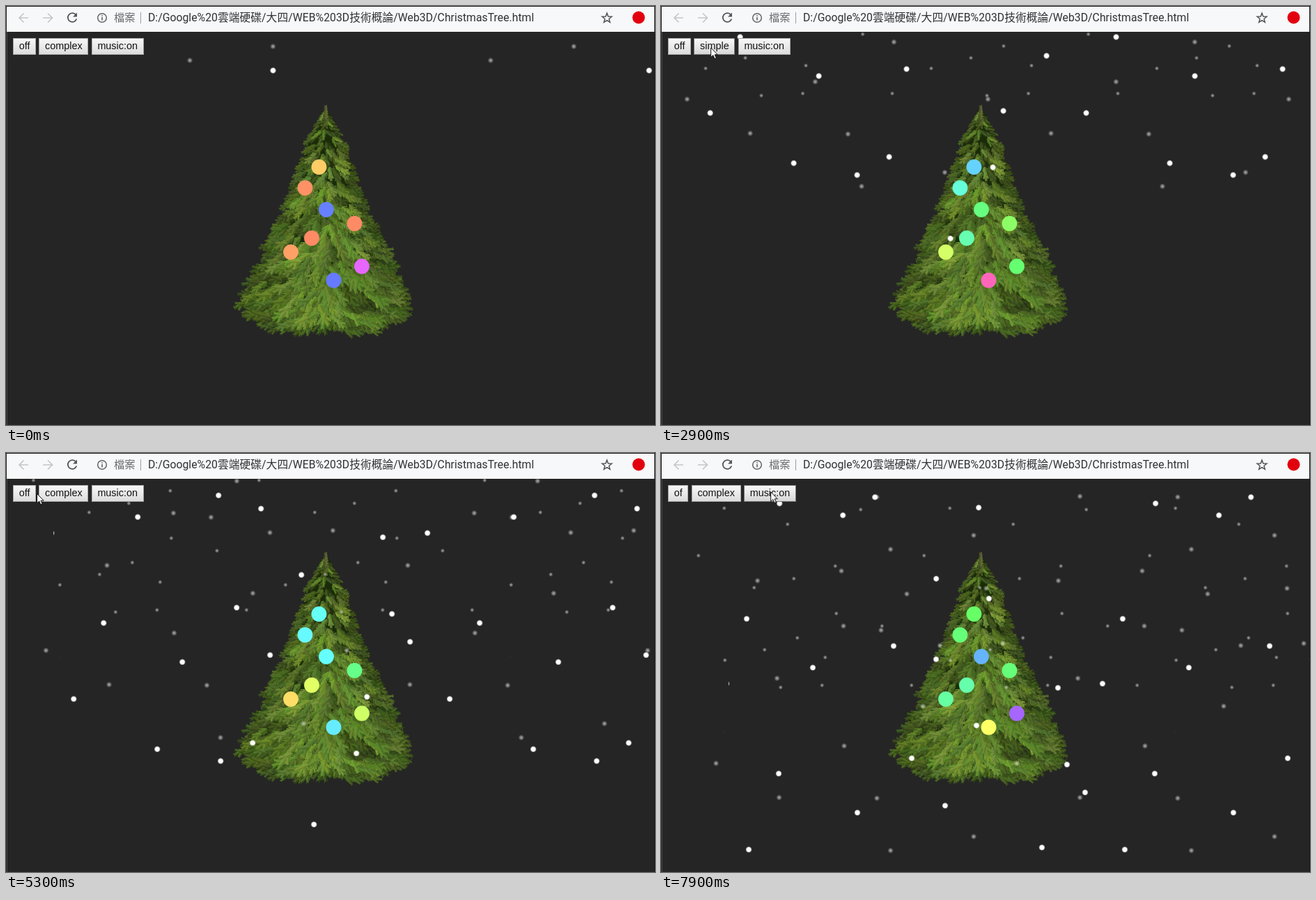
These frames come from a looping animation (932x601 px, 8 s). An HTML page with a canvas:

```html
<!DOCTYPE html>
<html lang="zh-Hant">
<head>
<meta charset="utf-8">
<title>ChristmasTree</title>
<style>
  html, body { margin: 0; width: 100%; height: 100%; overflow: hidden; background: #252525; }
  #stage { position: absolute; left: 0; top: 0; width: 932px; height: 601px; overflow: hidden; background: #252525; }
  #stage > canvas, #stage > svg { position: absolute; left: 0; top: 0; display: block; }
  #buttons { position: absolute; left: 10px; top: 46px; display: flex; gap: 4.3px; }
  #buttons span {
    box-sizing: border-box; height: 24px; padding: 0 7.7px; border: 1px solid #a6a6a6;
    background: linear-gradient(#f7f7f7, #dcdcdc); color: #111; white-space: nowrap;
    font: 14.4px/21.5px "Liberation Sans", Arial, sans-serif;
  }
  #buttons span.hover { border-color: #777; background: linear-gradient(#f8f8f8, #d6d6d6); }
  .url { font: 15.8px Roboto, "Noto Sans CJK TC", "Noto Sans CJK", sans-serif; }
</style>
</head>
<body>
<div id="stage">
  <canvas id="scene" width="932" height="601"></canvas>
  <svg width="932" height="601" fill="none">
    <rect width="932" height="37" fill="#f7f8f9"/>
    <path d="M0 .5H932" stroke="#222"/>
    <path d="M.5 0V601" stroke="#222"/>
    <path d="M1.5 37V601" stroke="#4a4a4a"/>
    <path d="M931.5 0V601" stroke="#151515"/>
    <g stroke="#c3c5c8" stroke-width="1.6">
      <path d="M32 17H19.500M25.500 10.500L19 17L25.500 23.500"/>
      <path d="M53 17H66M60 10.500L66.500 17L60 23.500"/>
    </g>
    <path d="M100.300 12.600A6.400 6.400 0 1 0 101.300 18.500" stroke="#55585c" stroke-width="1.8"/>
    <path d="M102 9.500V15.500H96Z" fill="#55585c"/>
    <circle cx="138" cy="17" r="6.300" stroke="#606367" stroke-width="1.5"/>
    <path d="M138 16V20.500M138 13.200V14.800" stroke="#606367" stroke-width="1.6"/>
    <text class="url" x="155" y="22" fill="#6a6d71" style="font-size:15.300px">檔案</text>
    <path d="M193.500 9V25" stroke="#9a9da1"/>
    <text class="url" x="204" y="22" fill="#303236">D:/Google%20雲端硬碟/大四/WEB%203D技術概論/Web3D/ChristmasTree.html</text>
    <path id="star" stroke="#505357" stroke-width="1.5"/>
    <circle cx="908.500" cy="16.500" r="9" fill="#e2000f"/>
  </svg>
  <div id="buttons"><span></span><span></span><span>music:on</span></div>
  <svg id="cursor" width="14" height="20"><path d="M.7 1V14.500L3.900 11.600L6 16.600L8.300 15.600L6.200 10.800H10.300Z" fill="#fff" stroke="#111"/></svg>
</div>
<script>
const LOOP = 8000, STEP = 100, HEAD = 37;
const ctx = document.getElementById('scene').getContext('2d');
const buttons = [...document.querySelectorAll('#buttons span')];
const cursor = document.getElementById('cursor');

// Snow sheets: tile size, fall speed (px/s), flake look, flake positions at time 0.
const LEAD = 0.85, SHEET = 568.5, SLANT = 2 / 15;
const layers = [
  { tile: 324, vy: 41.54, r: 3.2, core: 0.2, alpha: 0.52, flakes: [
    10, -181, 206.5, -166, 147, -148, 90, -135, 208, -98, 273.6, -80, 152, -63, 105, -46,
    192, -35, 48, -31, 128, 8, 187.5, 5, 316, 5, 243, -247, 138, -226, 47, -249] },
  { tile: 432, vy: 62.3, r: 4.3, core: 0.2, alpha: 0.55, flakes: [
    104, -430, 244.4, -429, 383.4, -374, 264, -354, 193.4, -323, 73, -309, 287.4, -290, 401.4, -298,
    196.4, -244, 250.4, -238, 335, -216, 425.4, -219, 101, -169, 310.4, -129, 197.4, -72, 13.4, -47] },
  { tile: 540, vy: 83.08, r: 4.7, core: 0.62, alpha: 1, flakes: [
    35.5, -418.5, 130.5, -348.5, 246.5, -379.5, 307.5, -360.5, 383.5, -447.5, 482.5, -319.5, 546.5, -325.5,
    365.5, -265.5, 272.5, -218.5, 495.5, -209.5, 320.5, -150.5, 81.5, -196.5, 521.5, -169.5, 194.5, -140.5,
    38.5, -87.5, 158.5, -15.5, 295.5, -24.5, 249.5, 1.5, 444.5, -9.5, 459.5, -90.5] }
];

const balls = [[449.5, 231], [429.5, 261], [460, 292], [500.5, 312], [439, 333], [409, 353], [511, 373.5], [470.5, 393.5]];
const hues = [
  [0, [40, 17, 230, 14, 14, 23, 290, 232]],
  [2100, [283, 180, 130, 18, 147, 78, 197, 38]],
  [3700, [112, 152, 130, 192, 152, 75, 52, 255]],
  [4600, [170, 205, 147, 80, 95, 67, 33, 203]],
  [6900, [190, 130, 255, 258, 17, 0, 185, 152]],
  [7900, [120, 128, 210, 128, 147, 143, 265, 60]]
];
const labels = [[0, 'off', 'complex'], [1200, 'off', 'simple'], [4900, 'off', 'complex'], [5700, 'on', 'complex'], [6500, 'of', 'complex']];
const pointer = [[300, [150, 31]], [800, [71, 59]], [4900, [71, 59]], [5400, [37, 57]], [5600, [33, 55]], [6500, [33, 55]], [6900, [120, 55]], [7900, [157, 55]]];

const lerp = (a, b, k) => a + (b - a) * k;
const lerpHue = (a, b, k) => a + ((b - a + 540) % 360 - 180) * k;

function sample(keys, t, mix) {
  let i = keys.findIndex(k => k[0] > t);
  if (i < 0) return keys[keys.length - 1][1];
  i = Math.max(i, 1);
  const [t0, a] = keys[i - 1], [t1, b] = keys[i];
  const k = Math.max(0, (t - t0) / (t1 - t0));
  return a.map((v, j) => mix(v, b[j], k));
}

function makeCanvas(w, h) {
  const c = document.createElement('canvas');
  c.width = w;
  c.height = h;
  return c;
}

function random(seed) {
  return () => (seed = (seed * 16807) % 2147483647) / 2147483647;
}

// Half width of the tree at height y.
const profile = [[142, 1], [155, 8], [170, 18], [190, 29], [215, 39], [245, 49], [265, 54], [290, 66], [305, 72],
  [340, 92], [365, 101], [385, 111], [410, 123], [435, 133], [450, 112], [465, 94], [472, 66]];
const halfWidth = y => sample(profile.map(([a, b]) => [a, [b]]), y, lerp)[0];

function drawTree() {
  const c = makeCanvas(932, 601), g = c.getContext('2d'), rnd = random(2718);
  const cx = 459;

  function sprig(x, y, angle, len, hue, sat, light) {
    const dx = Math.cos(angle), dy = Math.sin(angle);
    const x0 = x - dx * len, y0 = y - dy * len;
    const strokes = [0, 1].map(() => new Path2D());
    for (let d = 0; d <= len; d += 1.7) {
      const reach = Math.min(7.5, len * 0.3) * (1 - 0.55 * d / len) * lerp(0.75, 1.15, rnd());
      [-1, 1].forEach((side, i) => {
        const a = angle + side * lerp(0.5, 0.95, rnd());
        const px = x0 + dx * d, py = y0 + dy * d;
        strokes[i].moveTo(px, py);
        strokes[i].lineTo(px + Math.cos(a) * reach, py + Math.sin(a) * reach);
      });
    }
    g.lineWidth = 1.15;
    strokes.forEach((p, i) => {
      g.strokeStyle = `hsl(${hue},${sat}%,${light + (i ? 4 : -3)}%)`;
      g.stroke(p);
    });
    g.strokeStyle = `hsl(${hue - 12},${sat - 8}%,${light + 3}%)`;
    g.beginPath();
    g.moveTo(x0, y0);
    g.lineTo(x, y);
    g.stroke();
  }

  function bough(u, y, light) {
    const size = lerp(11, 36, Math.min(1, (y - 142) / 270)) * lerp(0.7, 1.15, rnd());
    const lift = lerp(1.1, 1.42, (y - 142) / 330);
    const angle = Math.PI / 2 - Math.sign(u) * Math.pow(Math.abs(u), 0.7) * lift + (rnd() - 0.5) * 0.6;
    const x = cx + u * (halfWidth(y) - 2);
    const hue = lerp(80, 92, rnd()), sat = lerp(44, 58, rnd());
    sprig(x, y, angle, size, hue, sat, light);
    if (size > 16) [-1, 1].forEach(s => sprig(
      x - Math.cos(angle) * size * 0.4 + Math.cos(angle + s * 0.65) * size * 0.32,
      y - Math.sin(angle) * size * 0.4 + Math.sin(angle + s * 0.65) * size * 0.32,
      angle + s * 0.6, size * 0.5, hue, sat, light + 1));
  }

  g.fillStyle = '#1b2b0a';
  g.beginPath();
  for (let y = 150; y <= 464; y += 4) g.lineTo(cx - halfWidth(y) * 0.8, y);
  for (let y = 464; y >= 150; y -= 4) g.lineTo(cx + halfWidth(y) * 0.8, y);
  g.fill();

  for (let y = 158; y < 468; y += 6.5) {
    [-1, 1].forEach(s => bough(s * lerp(0.88, 1.03, rnd()), y + rnd() * 5, lerp(17, 26, rnd())));
  }
  for (let u = -0.75; u <= 0.76; u += 0.075) bough(u, 462 + rnd() * 10, lerp(19, 28, rnd()));
  [[250, 15, 23], [260, 18, 31], [130, 27, 38]].forEach(([count, lo, hi], pass) => {
    for (let i = 0; i < count; i++) {
      const y = 152 + 312 * Math.sqrt(rnd());
      const u = (rnd() * 2 - 1) * (pass === 2 ? 0.8 : 0.96);
      bough(u, y, lerp(lo, hi, rnd()));
    }
  });
  for (let i = 0; i < 5; i++) sprig(cx + (i - 2) * 2.2, 153 + Math.abs(i - 2) * 4, -Math.PI / 2 + (i - 2) * 0.3, 13, 80, 45, 24);
  sprig(cx, 143, -Math.PI / 2, 20, 72, 34, 27);
  return c;
}

function drawFlake({ r, core, alpha }) {
  const c = makeCanvas(48, 48), g = c.getContext('2d');
  const fade = g.createRadialGradient(24, 24, r * 4 * core, 24, 24, r * 4);
  fade.addColorStop(0, `rgba(255,255,255,${alpha})`);
  fade.addColorStop(1, 'rgba(255,255,255,0)');
  g.fillStyle = fade;
  g.fillRect(0, 0, 48, 48);
  return c;
}

function drawSheet(layer, sec, copy) {
  const { tile, vy, flakes, sprite } = layer;
  const fall = vy * sec, lead = vy * LEAD;
  const ox = fall * SLANT - copy * SHEET * SLANT, oy = fall - copy * SHEET;
  const bottom = HEAD + lead + oy;
  ctx.save();
  ctx.beginPath();
  ctx.rect(lead * SLANT + ox, bottom - SHEET, 1200, SHEET);
  ctx.clip();
  for (let i = 0; i < flakes.length; i += 2) {
    for (let m = -1; m < 4; m++) for (let n = 0; n < 2; n++) {
      const x = flakes[i] + ox + m * tile, y = flakes[i + 1] + oy + n * tile;
      if (x > -6 && x < 938 && y > 30 && y < 607) ctx.drawImage(sprite, x - 6, y - 6, 12, 12);
    }
  }
  ctx.restore();
}

function render(t) {
  const [, power, mode] = labels.filter(l => l[0] <= t).pop();
  const sec = t / 1000;
  ctx.fillStyle = '#252525';
  ctx.fillRect(0, 0, 932, 601);
  ctx.drawImage(tree, 0, 0);
  layers.forEach(layer => [0, 1].forEach(copy => drawSheet(layer, sec, copy)));

  const hue = sample(hues, t, lerpHue);
  balls.forEach(([x, y], i) => {
    ctx.fillStyle = power === 'on' ? '#b3b3b3' : `hsl(${hue[i]},100%,70%)`;
    ctx.beginPath();
    ctx.arc(x, y, 10.9, 0, Math.PI * 2);
    ctx.fill();
  });

  buttons[0].textContent = power;
  buttons[1].textContent = mode;
  const [x, y] = sample(pointer, t, lerp), shown = t >= pointer[0][0];
  cursor.style.visibility = shown ? 'visible' : 'hidden';
  cursor.style.transform = `translate(${x}px,${y}px)`;
  buttons.forEach(b => {
    const left = b.offsetLeft + 10;
    b.classList.toggle('hover', shown && y > 45 && x >= left && x < left + b.offsetWidth);
  });
}

const starPoints = Array.from({ length: 10 }, (_, i) => {
  const a = i * Math.PI / 5 - Math.PI / 2, r = i % 2 ? 3.1 : 7.3;
  return `${863 + r * Math.cos(a)} ${17.5 + r * Math.sin(a)}`;
});
document.getElementById('star').setAttribute('d', `M${starPoints.join('L')}Z`);

const tree = drawTree();
layers.forEach(layer => { layer.sprite = drawFlake(layer); });

const start = performance.now();
function tick() {
  const t = (performance.now() - start) % LOOP;
  render(Math.floor(t / STEP) * STEP);
  requestAnimationFrame(tick);
}
tick();
</script>
</body>
</html>
```
